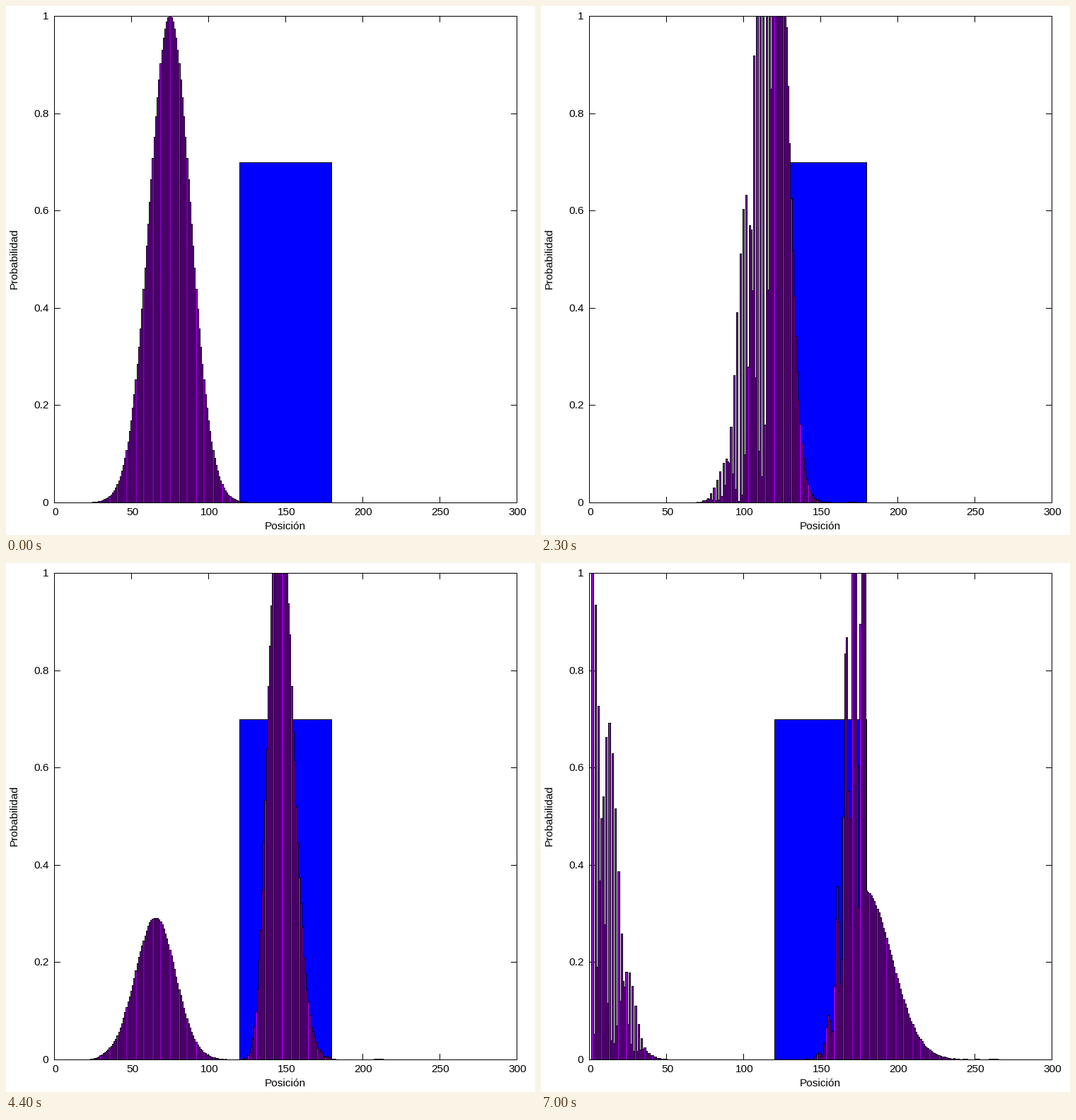
Write a matplotlib script that moves like this. It is 748 px wide and 748 px high and loops after 7.1 s.

```python
import numpy as np
import matplotlib.pyplot as plt
from matplotlib.animation import FuncAnimation
from matplotlib.collections import PolyCollection

SIZE, DPI = 748, 100
X0, X_SCALE = 68.65, 2.178
Y0, Y_SCALE = 702.5, 687.6
FRAMES, INTERVAL = 71, 100
STEPS_PER_FRAME = 10

# Wave packet on a lattice with a square barrier in the middle
N, CYCLES, BARRIER = 300, 70, 0.7
K0 = 2 * np.pi * CYCLES / N
DT = 1 / (4 * K0 ** 2)
WALL = (2 * N // 5, 3 * N // 5)
SITES = np.arange(2, N)  # the wave vanishes at sites 1 and N


def simulate():
    """Probability on the inner sites for each frame (Crank-Nicolson)."""
    count = len(SITES)
    inside = (SITES >= WALL[0]) & (SITES <= WALL[1])
    v = np.where(inside, BARRIER * K0 ** 2, 0)
    ones = np.ones(count - 1)
    h = np.diag(2 + v) - np.diag(ones, 1) - np.diag(ones, -1)
    eye = np.eye(count)
    step = np.linalg.solve(eye + 0.5j * DT * h, eye - 0.5j * DT * h)
    leap = np.linalg.matrix_power(step, STEPS_PER_FRAME)

    psi = np.exp(1j * K0 * SITES - 8 * (4 * SITES - N) ** 2 / N ** 2)
    states = [psi, step @ psi]
    while len(states) < FRAMES:
        states.append(leap @ states[-1])
    return np.abs(states) ** 2


def px(x):
    return np.floor(X0 + X_SCALE * x)


def py(p):
    return np.floor(Y0 - Y_SCALE * p)


LEFT, RIGHT, TOP, BOTTOM = px(0), px(N), py(1), py(0)


def rect(x0, y0, x1, y1):
    return [(x0, y0), (x1, y0), (x1, y1), (x0, y1)]


def boxes(spans):
    """Outer and inner rectangles of boxes with a one pixel outline."""
    outer = [rect(l, t, r + 1, BOTTOM + 1) for l, r, t in spans]
    inner = [rect(l + 1, t + 1, r, BOTTOM) for l, r, t in spans]
    return outer, inner


fig = plt.figure(figsize=(SIZE / DPI, SIZE / DPI), dpi=DPI, facecolor="white")
ax = fig.add_axes([0, 0, 1, 1])
ax.set_xlim(0, SIZE)
ax.set_ylim(SIZE, 0)
ax.axis("off")


def layer(rects, color, z):
    shapes = PolyCollection(rects, facecolors=color, edgecolors="none",
                            linewidths=0, antialiaseds=False, zorder=z)
    ax.add_collection(shapes, autolim=False)
    return shapes


def label(x, y, text, ha="center", rotation=0):
    ax.text(x, y, text, family="Liberation Sans", fontsize=15.4 * 72 / DPI,
            color="black", ha=ha, va="baseline", rotation=rotation,
            rotation_mode="anchor")


# Ticks lie under the data, the frame on top
ticks = []
for value in range(0, N + 1, 50):
    x = px(value)
    ticks += [rect(x, TOP, x + 1, TOP + 9), rect(x, BOTTOM - 8, x + 1, BOTTOM)]
    label(X0 + X_SCALE * value + 1, 720, str(value))
for i in range(6):
    y = py(i / 5)
    ticks += [rect(LEFT, y, LEFT + 9, y + 1), rect(RIGHT - 8, y, RIGHT, y + 1)]
    label(60.5, y + 5, f"{i / 5:g}", ha="right")
layer(ticks, "black", 1)
layer([rect(LEFT, TOP, RIGHT + 1, TOP + 1),
       rect(LEFT, BOTTOM, RIGHT + 1, BOTTOM + 1),
       rect(LEFT, TOP, LEFT + 1, BOTTOM + 1),
       rect(RIGHT, TOP, RIGHT + 1, BOTTOM + 1)], "black", 6)

label(394.5, 740, "Posición")
label(16, 357.5, "Probabilidad", rotation=90)

wall_outer, wall_inner = boxes([(px(WALL[0]), px(WALL[1]), py(BARRIER))])
layer(wall_outer, "black", 2)
layer(wall_inner, "#0000ff", 3)

outlines = layer([], "black", 4)
fills = layer([], "#9400d3", 5)

lefts, rights = px(SITES - 0.5), px(SITES + 0.5)
density = simulate()


def update(frame):
    tops = py(np.minimum(density[frame], 1))
    seen = tops < BOTTOM
    outer, inner = boxes(list(zip(lefts[seen], rights[seen], tops[seen])))
    outlines.set_verts(outer)
    fills.set_verts(inner)
    return outlines, fills


anim = FuncAnimation(fig, update, frames=FRAMES, interval=INTERVAL,
                     repeat=True, repeat_delay=0, blit=False)
plt.show()
```
